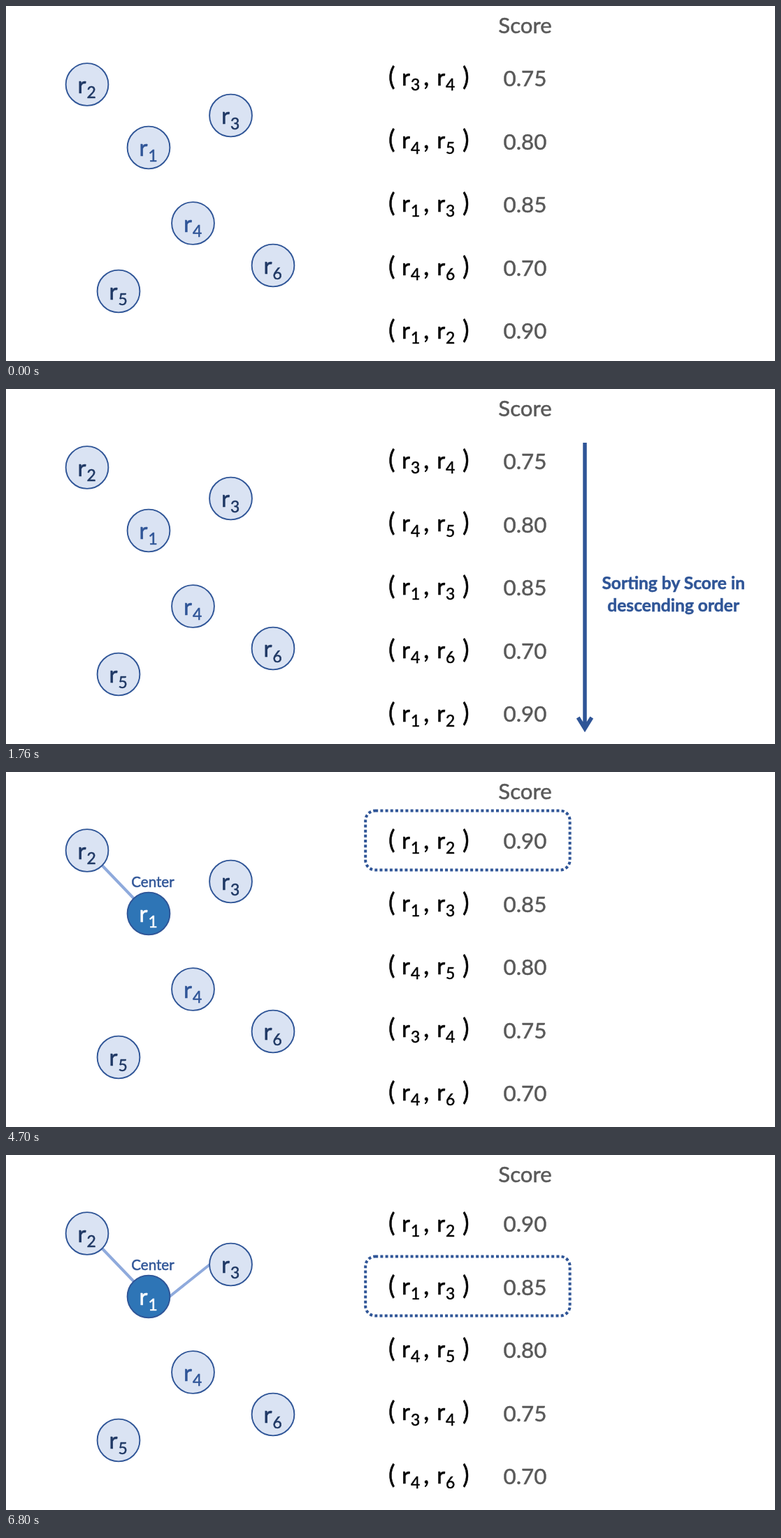
Write an HTML page that moves like this. It is 1100 px wide and 509 px high and loops after 8 s.

```html
<!DOCTYPE html>
<html lang="en">
<head>
<meta charset="utf-8">
<title>Pair sorting and clustering</title>
<style>
  html, body { margin: 0; width: 100%; height: 100%; overflow: hidden; background: #fff; }
  svg { display: block; width: 1100px; height: 509px; font-family: Lato, "Open Sans", sans-serif; }
</style>
</head>
<body>
<svg id="stage" viewBox="0 0 1100 509"></svg>
<script>
const NS = "http://www.w3.org/2000/svg";
const LOOP = 8000;
const BLUE = "#2f5597", NAVY = "#1f3864", PALE = "#dae3f3", GREY = "#595959";
const stage = document.getElementById("stage");
const timed = [];

function add(parent, tag, attrs, text) {
  const el = document.createElementNS(NS, tag);
  for (const k in attrs) el.setAttribute(k, attrs[k]);
  if (text !== undefined) el.textContent = text;
  parent.appendChild(el);
  return el;
}

// A thin outline gives the text a slightly heavier weight.
function label(parent, x, y, text, size, fill, more) {
  return add(parent, "text", {
    x, y, "font-size": size, fill, stroke: fill, "stroke-width": 0.5, ...more
  }, text);
}

// Group that is visible only from start to end (ms).
function during(start, end) {
  const el = add(stage, "g", {});
  timed.push({ el, start, end });
  return el;
}

function rItem(parent, x, y, n, fill) {
  label(parent, x, y, "r", 33, fill);
  label(parent, x + 12.9, y + 7.2, n, 22.8, fill);
}

function node(parent, n, x, y, ink, fill = PALE) {
  add(parent, "circle", { cx: x, cy: y, r: 30.4, fill, stroke: BLUE, "stroke-width": 1.9 });
  rItem(parent, x - 13.5, y + 12.3, n, ink);
}

const middle = { "text-anchor": "middle" };

function table(parent, rows, pairY, pairStep, scoreY) {
  rows.forEach(([a, b, score], i) => {
    const y = pairY + i * pairStep;
    label(parent, 547, y, "(", 36, "#000");
    rItem(parent, 566, y, a, "#000");
    label(parent, 597, y, ",", 37, "#000");
    rItem(parent, 616.2, y, b, "#000");
    label(parent, 653, y, ")", 36, "#000");
    label(parent, 742.5, scoreY + i * 90.5, score, 31.3, GREY, middle);
  });
}

function edge(parent, x1, y1, x2, y2) {
  add(parent, "line", { x1, y1, x2, y2, stroke: "#8faadc", "stroke-width": 4 });
}

function frameRow(parent, y) {
  add(parent, "rect", {
    x: 514.2, y, width: 292.4, height: 85, rx: 14, fill: "none",
    stroke: BLUE, "stroke-width": 4, "stroke-dasharray": "4 3.2"
  });
}

edge(during(4700, LOOP), 137.5, 134, 182.5, 181);
edge(during(6800, LOOP), 234, 203, 291.5, 157);

[[2, 116, 112.5, NAVY], [3, 321.5, 157, NAVY], [4, 267.5, 311.5, BLUE],
 [5, 161, 409, NAVY], [6, 382, 372, NAVY]].forEach(n => node(stage, ...n));
node(during(0, 4700), 1, 204, 203, BLUE);

const center = during(4700, LOOP);
node(center, 1, 204, 203, "#fff", "#2e75b6");
label(center, 210, 165, "Center", 20.6, BLUE, middle);

label(stage, 742.5, 39.3, "Score", 31.2, GREY, middle);

const pairs = [[3, 4, "0.75"], [4, 5, "0.80"], [1, 3, "0.85"], [4, 6, "0.70"], [1, 2, "0.90"]];
const sorted = [...pairs].sort((p, q) => q[2] - p[2]);
table(during(0, 2600), pairs, 113.5, 90.8, 115.4);
table(during(2600, LOOP), sorted, 109.5, 90.3, 110.3);

const arrow = during(500, 4700);
add(arrow, "path", {
  d: "M828 77V487M818.2 471L828 487L837.8 471", fill: "none",
  stroke: BLUE, "stroke-width": 5.5
});
["Sorting by Score in", "descending order"].forEach((line, i) =>
  label(arrow, 954.7, 287 + i * 32, line, 24.6, BLUE, { ...middle, "font-weight": 700 }));

frameRow(during(4700, 6800), 55.5);
frameRow(during(6800, LOOP), 145.5);

const begin = performance.now();
function draw(now) {
  const t = Math.max(0, now - begin) % LOOP;
  for (const { el, start, end } of timed)
    el.setAttribute("visibility", t >= start && t < end ? "visible" : "hidden");
  requestAnimationFrame(draw);
}
draw(begin);
</script>
</body>
</html>
```
